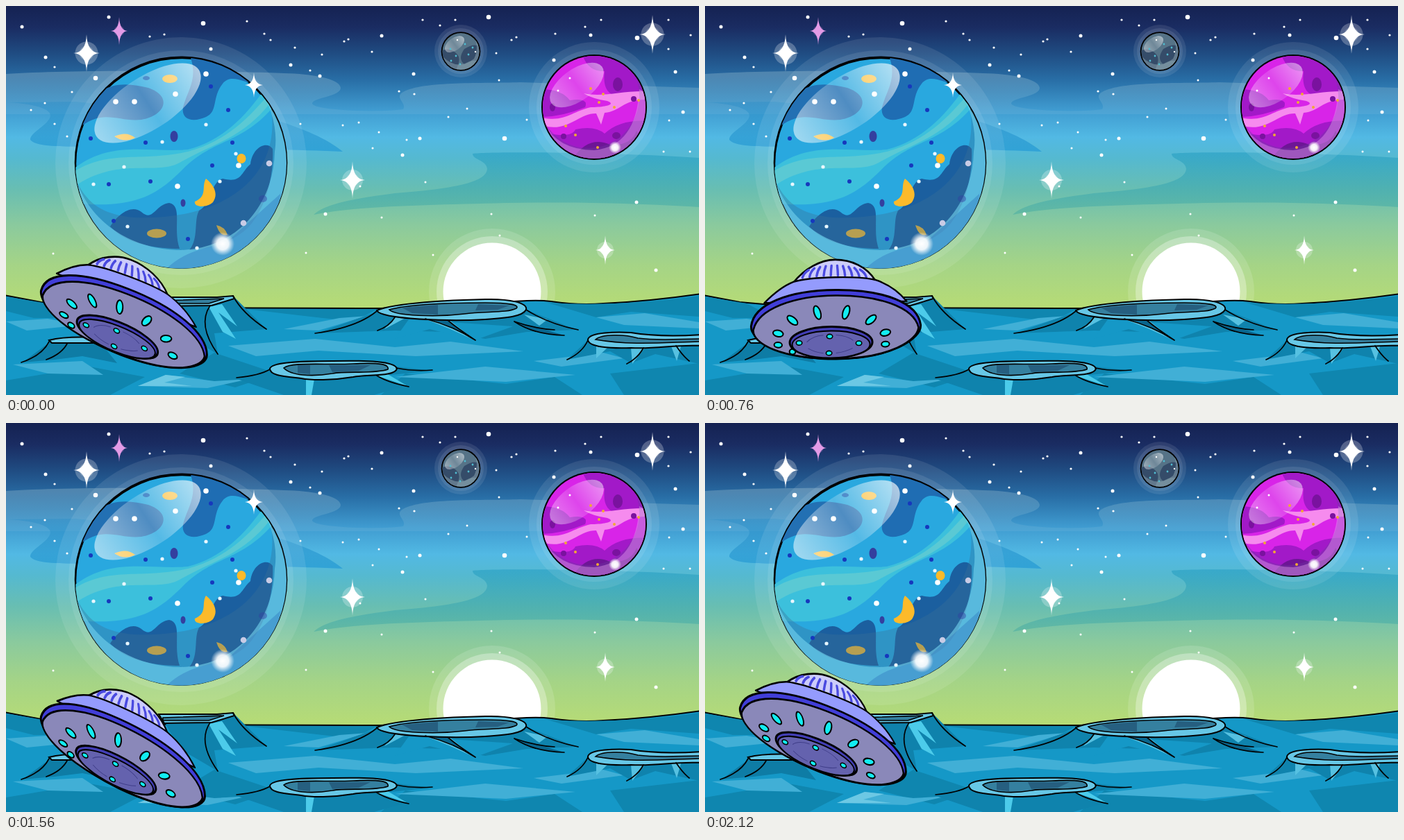
Recreate the animation shown at these times as an HTML page. Size 998 by 561 pixels, loop 2160 ms.

```html
<!DOCTYPE html>
<html lang="en">
<head>
<meta charset="utf-8">
<title>Saucer over an alien plain</title>
<style>
html, body { margin: 0; width: 100%; height: 100%; overflow: hidden; background: #15235a; }
svg { display: block; width: 100vw; height: 100vh; }
.line { fill: none; stroke: #000; stroke-width: 1.7; stroke-linecap: round; stroke-linejoin: round; }
.rim { fill: #67c7e6; stroke: #000; stroke-width: 2; }
.pit { fill: #35809f; stroke: #000; stroke-width: 1.6; }
.halo { fill: #fff; opacity: .09; }
</style>
</head>
<body>
<svg viewBox="0 0 998 561" preserveAspectRatio="none">
<defs>
  <linearGradient id="sky" gradientUnits="userSpaceOnUse" x1="0" y1="0" x2="0" y2="440">
    <stop offset="0" stop-color="#152252"/><stop offset=".07" stop-color="#1a2c62"/>
    <stop offset=".15" stop-color="#1f4a80"/><stop offset=".24" stop-color="#286da5"/>
    <stop offset=".34" stop-color="#3f9bd0"/><stop offset=".43" stop-color="#52b9e4"/>
    <stop offset=".5" stop-color="#55b9d0"/><stop offset=".6" stop-color="#68beb2"/>
    <stop offset=".72" stop-color="#8bca9d"/><stop offset=".85" stop-color="#a5d486"/>
    <stop offset="1" stop-color="#b8dc74"/>
  </linearGradient>
  <linearGradient id="haze" gradientUnits="userSpaceOnUse" x1="0" y1="92" x2="0" y2="156">
    <stop offset="0" stop-color="#b9d5dc" stop-opacity=".3"/><stop offset="1" stop-color="#8cc3de" stop-opacity=".16"/>
  </linearGradient>
  <linearGradient id="deep" gradientUnits="userSpaceOnUse" x1="0" y1="138" x2="0" y2="209">
    <stop offset="0" stop-color="#2a8cc6" stop-opacity=".4"/><stop offset="1" stop-color="#2b9fd6" stop-opacity=".85"/>
  </linearGradient>
  <linearGradient id="teal" gradientUnits="userSpaceOnUse" x1="0" y1="211" x2="0" y2="301">
    <stop offset="0" stop-color="#279fc4" stop-opacity=".62"/><stop offset="1" stop-color="#56b3a2" stop-opacity=".7"/>
  </linearGradient>
  <linearGradient id="shine" x1="0" y1="0" x2="1" y2="0">
    <stop offset="0" stop-color="#fff" stop-opacity=".55"/><stop offset=".5" stop-color="#fff" stop-opacity=".2"/>
    <stop offset="1" stop-color="#fff" stop-opacity=".65"/>
  </linearGradient>
  <radialGradient id="glow">
    <stop offset="0" stop-color="#fff"/><stop offset=".5" stop-color="#fff" stop-opacity=".9"/>
    <stop offset="1" stop-color="#fff" stop-opacity="0"/>
  </radialGradient>
  <clipPath id="bigClip"><circle cx="252" cy="226.5" r="152"/></clipPath>
  <clipPath id="pinkClip"><circle cx="847" cy="146" r="74"/></clipPath>
  <clipPath id="moonClip"><circle cx="655" cy="65.5" r="26.5"/></clipPath>
</defs>

<rect width="998" height="561" fill="url(#sky)"/>
<path fill="url(#haze)" d="M0,98C100,91 330,94 400,97C440,98 480,104 482,118C482,131 440,132 441,141C445,151 540,154 572,149C578,140 558,132 572,124C600,108 690,112 740,110L998,118V156H0Z"/>
<path fill="url(#deep)" d="M0,139C30,140 64,146 64,158C62,172 34,182 35,193C45,206 100,202 170,203C300,206 400,206 485,210C460,190 430,178 390,165L100,138Z"/>
<path fill="url(#teal)" d="M672,213C700,209 900,212 998,219V290C880,283 800,283 720,284C600,287 500,289 443,301C460,285 500,278 560,270C640,264 692,255 693,235C692,222 672,222 672,213Z"/>
<g id="stars" fill="#fff"></g>

<g>
  <circle class="halo" cx="252" cy="226" r="181"/><circle class="halo" cx="252" cy="226" r="162"/>
  <circle cx="252" cy="225.7" r="153.3"/>
  <g clip-path="url(#bigClip)">
    <circle cx="252.5" cy="227.5" r="151.3" fill="#29a8df"/>
    <path fill="#3cc0dc" d="M96,236C150,192 205,212 262,207C310,195 345,160 372,120L388,142C340,200 300,190 255,235C220,270 190,292 105,285Z"/>
    <path fill="#62ccd3" d="M96,240C150,206 190,226 262,210C320,194 350,160 378,128L382,138C340,192 300,197 250,226C215,245 160,216 96,262Z" opacity=".8"/>
    <path fill="#1f6db3" d="M265,72C277,105 262,120 255,146C252,165 270,168 288,160C306,152 296,132 312,112C325,96 345,113 362,112L320,70Z"/>
    <path fill="#2370b3" d="M100,168C130,105 170,110 205,118C240,130 230,158 195,164C160,168 140,145 100,180Z"/>
    <path fill="#1b5f9f" d="M150,318C160,302 180,285 195,297C212,312 215,286 235,284C255,288 240,320 250,350C220,350 175,345 150,318Z"/>
    <path fill="#1b5f9f" d="M264,352C278,335 270,310 278,295C295,287 295,253 312,249C340,256 338,240 352,228C355,203 376,194 384,206C386,245 374,292 350,318C330,339 295,351 264,352Z"/>
    <path fill="#fcba2a" d="M288,249C298,257 307,270 298,283C288,292 270,290 272,282C291,274 281,260 288,249Z"/>
    <path fill="#fcba2a" d="M303,316Q315,318 319,330Q308,333 303,316ZM156,188Q174,180 186,190Q170,198 156,188Z"/>
    <g fill="#fcba2a"><ellipse cx="236" cy="105" rx="11" ry="6"/><ellipse cx="339" cy="220" rx="6.5" ry="7"/><ellipse cx="217" cy="328" rx="14" ry="6.5"/></g>
    <path fill="#3c6f95" opacity=".36" fill-rule="evenodd" d="M99,227a153,153 0 1,0 306,0a153,153 0 1,0 -306,0M383,160C390,250 310,310 184,305C130,300 106,278 90,220C80,100 180,60 265,68C325,75 378,110 383,160Z"/>
    <path fill="#72d0ec" opacity=".62" d="M98,240C115,310 180,352 252,352C330,350 385,290 387,210C392,180 383,145 362,112L410,130L410,385H90Z"/>
    <path fill="#347dc0" opacity=".45" d="M230,380Q258,351 314,344L396,270L380,340L300,382Z"/>
    <ellipse cx="204" cy="140" rx="88" ry="38" transform="rotate(-33 204 140)" fill="url(#shine)"/>
    <g fill="#343f9f"><ellipse cx="242" cy="188" rx="5.5" ry="8"/><ellipse cx="255" cy="284" rx="3.5" ry="5.5"/><ellipse cx="370" cy="278" rx="6" ry="5" opacity=".45"/><ellipse cx="202" cy="104" rx="5" ry="3" opacity=".4"/></g>
    <g id="bigDots"></g>
  </g>
  <circle cx="312" cy="343" r="17" fill="url(#glow)"/>
</g>

<g>
  <circle class="halo" cx="847" cy="146" r="94"/><circle class="halo" cx="847" cy="146" r="83"/>
  <circle cx="847" cy="146" r="76"/>
  <g clip-path="url(#pinkClip)">
    <rect x="770" y="70" width="154" height="152" fill="#d824e8"/>
    <path fill="#a219c8" d="M830,70Q838,95 862,94Q858,126 880,130Q910,124 930,118V70ZM770,120Q800,120 812,136Q840,132 834,146Q800,160 770,160ZM782,184Q815,190 820,178Q848,172 862,184Q885,162 930,166V222H782Z"/>
    <path fill="#f68bee" d="M832,126C860,132 885,122 922,123V135C890,134 885,152 862,154L857,171L850,155C825,154 808,184 772,172V161C805,168 815,152 842,146C862,146 880,142 866,137Q845,134 832,126Z"/>
    <path fill="#6d1596" d="M815,222Q838,186 870,200Q900,202 908,180L920,200L860,222Z"/>
    <g fill="#7a129f"><ellipse cx="881" cy="113" rx="7" ry="10"/><ellipse cx="879" cy="187" rx="6" ry="5"/><ellipse cx="787" cy="146" rx="4" ry="6"/><circle cx="904" cy="134" r="4"/><circle cx="803" cy="188" r="4"/></g>
    <path fill="#6d3ca0" opacity=".36" fill-rule="evenodd" d="M760,60H930V230H760ZM766,130a73,75 0 1,0 146,0a73,75 0 1,0 -146,0"/>
    <path fill="#e9a7ef" opacity=".4" d="M770,160Q790,208 847,208Q908,202 912,120L930,130V225H770Z"/>
    <ellipse cx="822" cy="114" rx="45" ry="23" transform="rotate(-36 822 114)" fill="url(#shine)" opacity=".75"/>
    <g id="pinkDots"></g>
  </g>
  <circle cx="877" cy="204" r="9" fill="url(#glow)"/>
</g>

<g>
  <circle class="halo" cx="655" cy="65" r="38"/><circle class="halo" cx="655" cy="65" r="33"/>
  <circle cx="655" cy="65.5" r="28.3"/>
  <g clip-path="url(#moonClip)">
    <rect x="626" y="36" width="60" height="60" fill="#567387"/>
    <path fill="#354c69" d="M626,65Q640,58 650,70Q656,76 648,92L626,92ZM660,62Q675,52 684,60V80Q670,76 660,84Q650,76 660,62Z"/>
    <path fill="#9ab0b9" opacity=".45" d="M628,72Q650,95 674,76Q682,60 674,45L690,50V95H628Z"/>
    <ellipse cx="646" cy="55" rx="16" ry="9" transform="rotate(-36 646 55)" fill="url(#shine)" opacity=".75"/>
    <g id="moonDots"></g>
  </g>
</g>
<g id="sparks"></g>

<circle cx="700" cy="412" r="91" fill="#fff" opacity=".13"/><circle cx="700" cy="412" r="80" fill="#fff" opacity=".3"/>
<circle cx="700" cy="412" r="70.5" fill="#fff"/>

<g>
  <path fill="#1598c7" stroke="#000" stroke-width="2" d="M-3,417L50,427L130,434L355,435.500L540,436L750,425Q770,424 785,426Q825,432 860,429Q925,426 1001,415V565H-3Z"/>
  <path fill="#0f86af" d="M0,419L60,429L100,450L40,450L0,440ZM345,437H535L500,455L430,447ZM780,428Q890,434 998,418V448L900,441L850,449ZM0,540L120,520L200,535L150,561H0ZM575,530L720,545L790,535L830,561H540ZM870,530L998,515V561H890ZM300,500L390,530L330,550L250,530Z"/>
  <path fill="#41afd6" d="M0,455L60,451L110,460L30,468ZM320,490L445,480L560,492L640,484L745,498L590,505L450,497L360,505ZM190,548L230,532L300,541L350,538L290,551ZM10,517L110,512L140,532L60,530ZM480,450L520,447L450,468L400,466ZM560,535L690,520L820,532L720,542ZM850,449L920,443L998,456V465L890,460ZM760,512L860,500L890,508L800,520Z"/>
  <path fill="#6cc8e4" d="M190,548L230,532L258,535L228,543L268,548Z"/>

  <path fill="#0f82ac" d="M225,425L327,418L375,466L300,472L305,502L250,470Z"/>
  <path fill="#4ccbea" d="M292,434L311,430L333,462L306,442L331,480L312,470Z"/>
  <path class="rim" d="M220,420L304,420L327,418L329,422L296,432L228,433Z"/>
  <path class="pit" d="M226,425L314,422L292,429H226Z"/>
  <path class="line" d="M327,418Q340,443 375,466M294,432Q275,460 305,502"/>

  <path fill="#0e7ca5" d="M64,484L130,478L160,515L110,505L70,510L24,514Z"/>
  <path class="rim" d="M62,482Q85,476 130,478L140,486L66,486Z"/>
  <path class="line" d="M62,484Q52,504 22,514M88,487Q80,502 58,510"/>

  <path fill="#0f83ad" d="M534,441L447,472L560,468L635,470L690,480L750,470L822,467L749,438Z"/>
  <path fill="#1598c7" d="M580,452L560,480L610,466L675,482L730,462Z"/>
  <path fill="#56c1e1" d="M600,450L636,451L675,482L640,466ZM560,449L575,450L545,466ZM746,445L780,452L768,461Z"/>
  <path fill="#09658d" d="M604,450L636,453L674,482Q640,460 604,450ZM732,455Q760,462 804,475Q765,474 732,455Z"/>
  <path class="rim" d="M534,439C560,428 640,424 690,423C725,422 752,428 749,438C744,448 720,450 690,452C640,455 540,452 534,439Z"/>
  <path class="pit" d="M552,438C580,430 640,428 690,428C725,428 740,431 735,436C722,443 690,440 660,444C620,449 560,447 552,438Z"/>
  <path fill="#265f80" d="M570,435L622,431V445L585,443ZM680,430L725,432L708,438L676,439Z"/>
  <path class="line" d="M534,440Q505,464 445,472M604,451Q645,462 676,482Q650,465 636,453M749,438Q780,458 824,467M732,455Q760,474 804,475M732,455Q760,465 790,467M560,449Q552,462 535,468"/>

  <path fill="#0f83ad" d="M380,525L330,537L400,561H530L575,548L545,533L612,526L563,520Z"/>
  <path fill="#4ccbea" d="M432,538H444L440,561H432ZM530,532L548,530L578,548Z"/>
  <path class="rim" d="M380,523C382,514 420,512 470,512C520,511 560,512 563,523C560,535 520,531 500,535C470,540 440,540 425,537C400,534 380,533 380,523Z"/>
  <path class="pit" d="M400,522C410,513 460,518 500,516C540,514 552,517 550,524C530,531 490,526 470,530C440,535 410,533 400,522Z"/>
  <path fill="#265f80" d="M420,518H438V531L420,529ZM465,518H525L508,526L470,528Z"/>
  <path class="line" d="M380,524Q365,533 332,536M562,522Q585,527 614,525M534,533Q550,543 580,549"/>

  <path fill="#0f83ad" d="M838,482L808,510L870,498L900,515L935,502L998,516V490Z"/>
  <path fill="#56c1e1" d="M850,489L868,491L850,508ZM900,493L920,493L902,516ZM958,491H972L966,512Z"/>
  <path class="rim" d="M838,481C840,470 880,470 900,471C930,476 970,476 1001,474V490C960,488 940,495 900,493C870,494 838,492 838,481Z"/>
  <path class="pit" d="M849,481C858,473 890,473 910,479C940,483 970,480 1001,480V484C950,485 900,490 849,481Z"/>
  <path class="line" d="M838,482Q830,500 808,510M918,493Q910,508 894,516M965,490Q975,505 984,512"/>
</g>

<g id="ufo" stroke="#000" stroke-linejoin="round">
  <path fill="#ccccfb" stroke-width="2.6" d="M-61,-62C-45,-82 -22,-94.500 -1,-94.500C22,-94.500 45,-84 57,-64C30,-56 -30,-56 -61,-62Z"/>
  <g id="ribs" stroke="#4a4ae0" stroke-width="3.4" stroke-linecap="round"></g>
  <path fill="#949bfd" stroke-width="2.4" d="M-103,-33C-88,-48 -74,-58 -61,-63C-35,-71 35,-71 57,-65C78,-58 92,-46 102,-34Z"/>
  <path fill="#413ed8" stroke-width="3" d="M-122,0C-118,-31 -70,-51 0,-51C70,-51 118,-31 122,0C124,20 80,48 0,48.500C-80,48 -124,20 -122,0Z"/>
  <path fill="#8a88b9" stroke-width="2.6" d="M-119,6C-112,-25 -60,-43 0,-43C60,-43 112,-26 119,4C117,23 78,48 0,48C-78,48 -120,26 -119,6Z"/>
  <g id="lamps" fill="#12edf1" stroke-width="2"></g>
  <ellipse cx="-7" cy="24.500" rx="59.500" ry="22.500" fill="#423eb5" stroke-width="3"/>
  <ellipse cx="-7" cy="27.500" rx="56" ry="19.500" fill="#6462ae" stroke-width="2"/>
  <path fill="none" stroke="#3f3d88" stroke-width="1" d="M-42,24Q-34,15 -18,14M0,14Q16,15 25,22M-40,33Q-30,39 -18,40M0,40Q15,38 24,33"/>
  <g id="feet" fill="#12edf1" stroke-width="1.6"></g>
</g>
</svg>
<script>
const $ = id => document.getElementById(id);
const points = text => text.split(" ").map(p => p.split(",").map(Number));
const dots = (text, r, fill) => points(text)
  .map(([x, y]) => `<circle cx="${x}" cy="${y}" r="${r}" fill="${fill}"/>`).join("");

$("stars").innerHTML =
  dots("284,25 695,16 909,46 718,191 129,104", 3.3, "#fff") +
  dots("23,30 148,16 295,62 57,74 541,43 452,101 587,98 789,78 964,95 975,153 908,283 936,381 571,215 596,191 460,300 410,85 842,42", 2.5, "#fff") +
  dots("207,44 228,41 347,22 381,49 372,40 416,60 455,70 487,51 493,48 527,66 438,93 70,88 56,140 36,150 70,170 95,124 88,188 600,20 566,123 588,127 625,28 647,20 728,49 735,45 791,40 834,30 857,20 954,20 986,42 954,62", 1.6, "#fff") +
  dots("706,68 710,107 637,160 664,148 508,168 537,182 528,205 577,193 424,170 485,172 541,305 604,254 699,300 711,331 615,359 432,356 848,302 947,210 985,210 955,165 68,357 750,164 510,260", 1.5, "#fff");

$("bigDots").innerHTML =
  dots("288,98 158,138 185,138 244,127 335,230 247,260", 3.8, "#fff") +
  dots("288,171 225,196 170,232 126,257 331,213 308,253 275,349 175,318", 2.6, "#e9f7ff") +
  dots("342,313 379,227", 4.3, "#c8cbe5") +
  dots("295,116 320,150 122,191 201,197 326,197 297,230 148,257 208,253 155,310 262,336", 3, "#1638bd");
$("pinkDots").innerHTML = dots("842,119 860,127 876,146 854,139 911,136 820,186 852,204 806,173", 2, "#f1a933") +
  dots("812,104 795,122", 1.5, "#fff");
$("moonDots").innerHTML = dots("640,62 648,72 661,55 666,70 672,60 654,84 641,79", 1.4, "#51bdd1") +
  dots("650,49 676,66", 1.2, "#fff");

const spark = ([x, y, h, w, glow, color]) => `<g transform="translate(${x} ${y})" fill="${color}">
  <circle r="${glow * 1.5}" opacity=".25"/><circle r="${glow}" fill="${color === "#fff" ? "url(#glow)" : color}"/>
  <path d="M0,${-h}Q.8,-.8 ${w},0Q.8,.8 0,${h}Q-.8,.8 ${-w},0Q-.8,-.8 0,${-h}Z"/></g>`;
$("sparks").innerHTML = [
  [116, 68, 27, 19, 11, "#fff"], [163, 36, 20, 12, 5, "#e39be6"], [357, 114, 18, 13, 4, "#fff"],
  [499, 251, 27, 18, 10, "#fff"], [931, 41, 28, 19, 11, "#fff"], [863, 352, 21, 14, 8, "#fff"]
].map(spark).join("");

let ribs = "";
for (let i = 0; i < 10; i++) {
  const u = i / 4.5 - 1, bow = u * u;
  ribs += `<path d="M${-2 + 46 * u},${-72 + 3 * bow}Q${-2 + 44 * u},${-80 + 4 * bow} ${-2 + 37 * u},${-86 + 6 * bow}"/>`;
}
$("ribs").innerHTML = ribs;
$("feet").innerHTML = points("-9,16 -53,25 33,26 -10,40")
  .map(([x, y]) => `<ellipse cx="${x}" cy="${y}" rx="4.2" ry="3.2"/>`).join("");

const LOOP = 2160, STEP = 40;
// time, x, y, tilt
const poses = [
  [0, 170, 456.5, .38], [440, 189.5, 459, 0], [600, 190.5, 457.8, -.012], [760, 188.5, 460.5, -.008],
  [960, 177.5, 474.5, .287], [1120, 171, 483.5, .43], [1280, 168.5, 486.5, .48],
  [1680, 168.6, 476, .465], [1760, 169, 466.5, .4385], [2120, 170, 456.5, .38], [2160, 170, 456.5, .38]
];
// time, lamp angle in degrees
const spin = [[0, 2], [440, -128], [760, -225], [960, -278.5], [1280, -368.5], [1760, -503], [2120, -608], [2160, -628]];

const slope = (k, i, c) => (k[i + 1][c] - k[i][c]) / (k[i + 1][0] - k[i][0]);
function tangent(k, i, c) {
  if (i === 0 || i === k.length - 1) return 0;
  const a = slope(k, i - 1, c), b = slope(k, i, c);
  return a * b > 0 ? 2 * a * b / (a + b) : 0;
}
function at(k, t, c, smooth) {
  let i = 0;
  while (i < k.length - 2 && t >= k[i + 1][0]) i++;
  const d = k[i + 1][0] - k[i][0], u = (t - k[i][0]) / d, p = k[i][c], q = k[i + 1][c];
  if (!smooth) return p + (q - p) * u;
  const v = 1 - u;
  return v * v * (1 + 2 * u) * p + u * u * (3 - 2 * u) * q +
    d * u * v * (v * tangent(k, i, c) - u * tangent(k, i + 1, c));
}

function lamp(deg) {
  const a = deg * Math.PI / 180, cos = Math.cos(a), sin = Math.sin(a);
  const x = -6 + 80 * cos, y = 22 - (sin > 0 ? 42 : 22) * sin;
  const lean = Math.atan2(60 * cos, 50 * Math.max(sin, .1)) * 180 / Math.PI;
  const long = sin > 0 ? 6.5 + 3.6 * sin : 6.5 + 3 * sin;
  return `<ellipse rx="${sin > 0 ? 4.6 : 3.8}" ry="${long}" transform="translate(${x} ${y}) rotate(${lean})"/>`;
}

function draw(now) {
  const t = Math.floor(now % LOOP / STEP) * STEP;
  const [x, y, k] = [1, 2, 3].map(c => at(poses, t, c, true));
  $("ufo").setAttribute("transform", `matrix(${1 - .15 * k * k} ${k} ${-.3 * k} ${1 - .12 * k} ${x} ${y})`);
  const phase = (at(spin, t, 1) % 30 + 30) % 30;
  let lamps = "";
  for (let deg = phase - 30; deg < 230; deg += 30) if (deg > -25) lamps += lamp(deg);
  $("lamps").innerHTML = lamps;
}

const start = performance.now();
function tick() {
  draw(performance.now() - start);
  requestAnimationFrame(tick);
}
tick();
</script>
</body>
</html>
```
